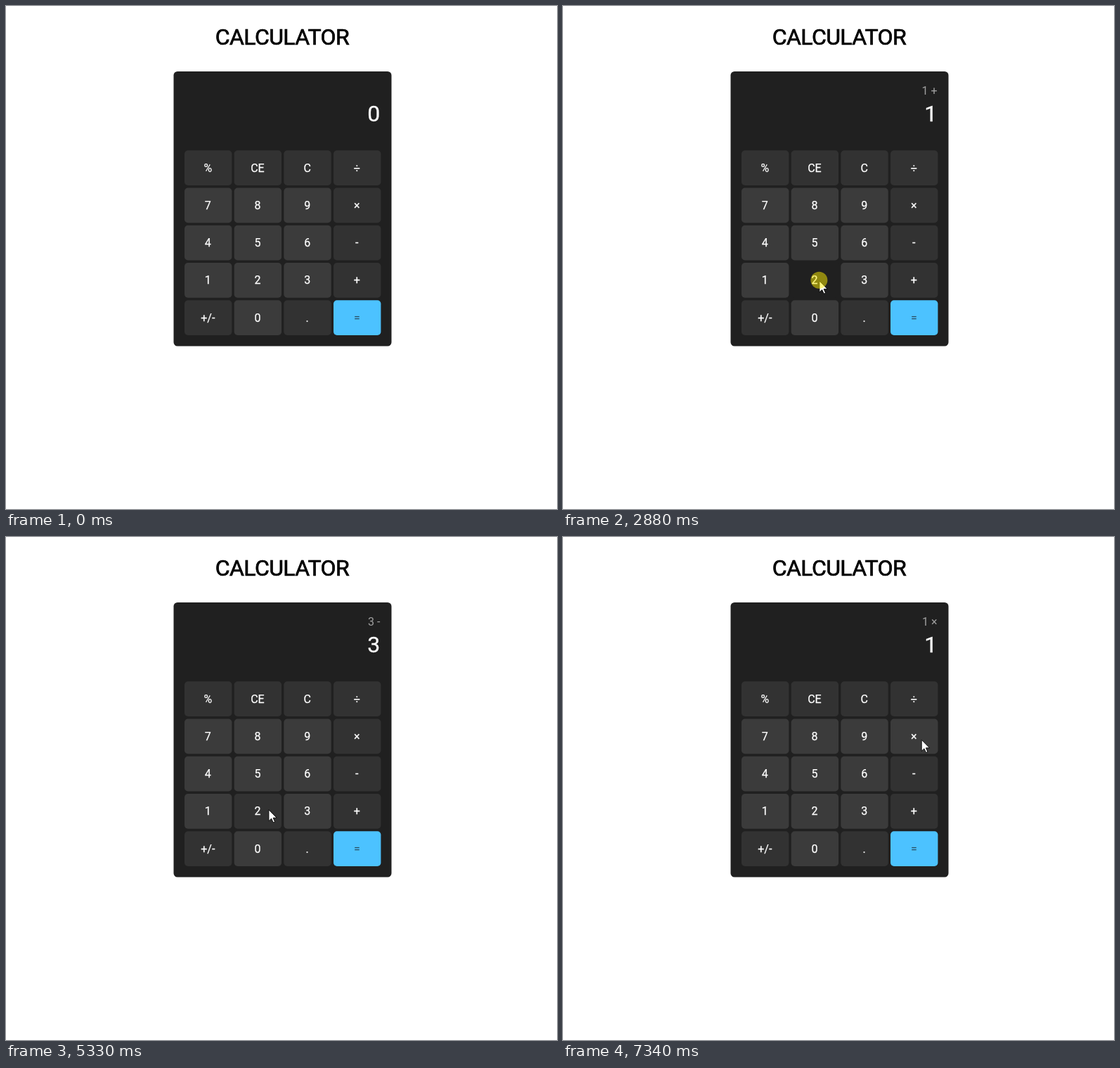
An HTML page for the animation above (8 s loop, 784 by 715 pixels).

```html
<!DOCTYPE html>
<html lang="en">
<head>
<meta charset="utf-8">
<title>Calculator</title>
<style>
  html, body { margin: 0; width: 100%; height: 100%; overflow: hidden; background: #fff; }
  svg { display: block; width: 784px; height: 715px; font: 16px Roboto, sans-serif; }
  .title { font-size: 32px; letter-spacing: -.6px; stroke: #000; stroke-width: .7; }
  .keys { text-anchor: middle; }
  .keys text { fill: #fff; stroke: #fff; stroke-width: .25; }
  .keys .equals { fill: #2a4f63; stroke: none; }
  .end { text-anchor: end; }
</style>
</head>
<body>
<svg viewBox="0 0 784 715">
  <text class="title" x="393" y="55" text-anchor="middle">CALCULATOR</text>
  <rect x="238.5" y="93" width="310" height="390.5" rx="5.5" fill="#202020"/>
  <text id="expr" class="end" x="532.5" y="126" fill="#a0a0a0"></text>
  <text id="value" class="end" x="532.3" y="164" font-size="32" fill="#fff" stroke="#fff" stroke-width=".3"></text>
  <g id="keys" class="keys"></g>
  <path id="cursor" d="M.5 1V17L4.2 13.5 6.8 19.1 9.2 18.1 6.7 12.5H11.8Z" fill="#fff" stroke="#000" stroke-width=".9"/>
  <circle id="press" r="12" fill="#fff000" fill-opacity=".5"/>
</svg>
<script>
const LOOP = 8000, HOLD = 140;
const KEY = { w: 67.4, h: 49.6, left: 254, top: 205.3, stepX: 70.67, stepY: 53.25 };
const $ = id => document.getElementById(id);

// Key colours: idle, hovered, pressed
const skins = {
  digit: ['#3b3b3b', '#323232', '#202020'],
  op: ['#323232', '#3b3b3b', '#323232'],
  equals: ['#4cc2ff', '#47b1e8', '#429fd6']
};

function add(tag, attrs) {
  const el = document.createElementNS('http://www.w3.org/2000/svg', tag);
  for (const name in attrs) el.setAttribute(name, attrs[name]);
  return $('keys').appendChild(el);
}

const keys = '% CE C ÷ 7 8 9 × 4 5 6 - 1 2 3 + +/- 0 . ='.split(' ').map((label, i) => {
  const x = KEY.left + i % 4 * KEY.stepX;
  const y = KEY.top + Math.floor(i / 4) * KEY.stepY;
  const kind = label === '=' ? 'equals' : /\d/.test(label) ? 'digit' : 'op';
  const rect = add('rect', { x, y, width: KEY.w, height: KEY.h, rx: 5 });
  const text = add('text', { x: x + KEY.w / 2 - .4, y: Math.round(y + 30.3), class: kind });
  text.textContent = label;
  return { label, kind, x, y, rect, text };
});

// Pointer stops: place relative to a key's centre, travel time, optional press and bow of the path
const stops = [
  { key: '1', dx: -15, dy: -12, leave: 1120, arrive: 1670, press: 1810, bow: -.23 },
  { key: '+', dx: -14, dy: -5, leave: 1940, arrive: 2330, press: 2330 },
  { key: '2', dx: 6, dy: 0, leave: 2470, arrive: 2800, press: 2800 },
  { key: '=', dx: -3, dy: -4, leave: 2940, arrive: 3230, press: 3300 },
  { key: '-', dx: 3, dy: 5, leave: 3840, arrive: 4460, press: 4990 },
  { key: '2', dx: 6, dy: 0, leave: 5130, arrive: 5400, press: 5400 },
  { key: '=', dx: -14, dy: -8, leave: 5590, arrive: 6000, bow: -.31 },
  { key: '=', dx: -13, dy: -27, leave: 6600, arrive: 6670 },
  { key: '×', dx: 10, dy: 4, leave: 6810, arrive: 7130, press: 7130 }
];

let from = { x: 660, y: 697 };
for (const stop of stops) {
  const key = keys.find(k => k.label === stop.key);
  stop.from = from;
  stop.to = from = { x: key.x + KEY.w / 2 + stop.dx, y: key.y + KEY.h / 2 + stop.dy };
}
const presses = stops.filter(s => s.press);

function pointerAt(t) {
  const { from: a, to: b, leave, arrive, bow = 0 } = stops.filter(s => t >= s.leave).pop() || stops[0];
  const p = Math.min(1, Math.max(0, (t - leave) / (arrive - leave)));
  const u = 1 - (1 - p) ** 2;
  const bend = 2 * u * (1 - u) * bow;
  const dx = b.x - a.x, dy = b.y - a.y;
  return { x: a.x + dx * u - dy * bend, y: a.y + dy * u + dx * bend };
}

const compute = {
  '+': (a, b) => a + b,
  '-': (a, b) => a - b,
  '×': (a, b) => a * b
};

// Replay every key released so far
function displayAt(t) {
  let expr = '', value = 0, left = 0, op = '';
  for (const { key, press } of presses) {
    if (t < press + HOLD) break;
    if (/\d/.test(key)) {
      value = +key;
      continue;
    }
    const right = value;
    if (op) value = compute[op](left, right);
    expr = key === '=' ? `${left} ${op} ${right} =` : `${value} ${key}`;
    left = value;
    op = key === '=' ? '' : key;
  }
  return { expr, value };
}

function draw(t) {
  const shown = t >= stops[0].leave;
  const down = presses.some(({ press }) => t >= press && t < press + HOLD);
  const { x, y } = pointerAt(t);

  for (const k of keys) {
    const over = shown && x >= k.x && x < k.x + KEY.w && y >= k.y && y < k.y + KEY.h;
    const state = over ? (down ? 2 : 1) : 0;
    k.rect.setAttribute('fill', skins[k.kind][state]);
    k.text.setAttribute('visibility', k.kind === 'equals' && state === 2 ? 'hidden' : 'visible');
  }

  const { expr, value } = displayAt(t);
  $('expr').textContent = expr;
  $('value').textContent = value;

  for (const [id, visible] of [['cursor', shown], ['press', down]]) {
    $(id).setAttribute('transform', `translate(${x.toFixed(2)} ${y.toFixed(2)})`);
    $(id).setAttribute('visibility', visible ? 'visible' : 'hidden');
  }
}

const begin = performance.now();
function tick() {
  draw((performance.now() - begin) % LOOP);
  requestAnimationFrame(tick);
}
draw(0);
requestAnimationFrame(tick);
</script>
</body>
</html>
```
